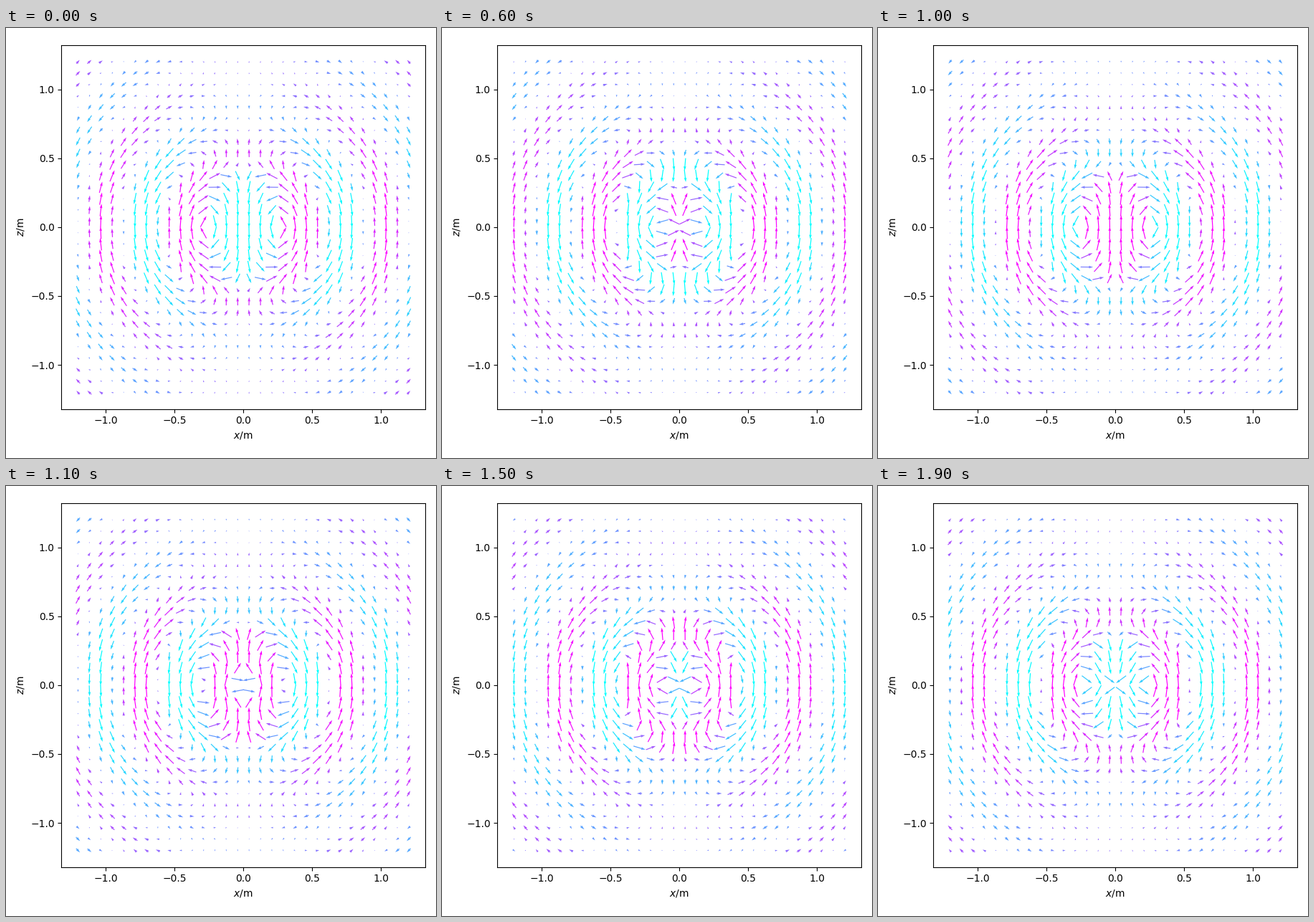
These frames come from a looping animation (600x600 px, 2000 ms). A matplotlib script:

```python
import numpy as np
import matplotlib.pyplot as plt
from matplotlib.animation import FuncAnimation

FRAMES = 20
INTERVAL = 100
WAVELENGTH = 0.6
K = 2 * np.pi / WAVELENGTH
LIMIT = 100  # longest arrow, in field units

axis = np.linspace(-1.2, 1.2, 30)
X, Z = np.meshgrid(axis, axis)
R = np.hypot(X, Z)
SIN, COS = X / R, Z / R


def dipole_field(frame):
    """Electric field of an oscillating dipole along z, capped in length."""
    phase = 2 * np.pi * frame / FRAMES - K * R
    near = np.sin(phase) / R**3 + K * np.cos(phase) / R**2
    far = K**2 * np.sin(phase) / R
    e_r = 2 * COS * near
    e_theta = SIN * (near - far)
    ex = e_r * SIN + e_theta * COS
    ez = e_r * COS - e_theta * SIN
    cap = np.minimum(1, LIMIT / np.hypot(ex, ez))
    return ex * cap, ez * cap


fig, ax = plt.subplots(figsize=(6, 6), dpi=100)
ex, ez = dipole_field(0)
arrows = ax.quiver(X, Z, ex, ez, ez, cmap="cool", pivot="mid")
arrows.set_clim(-LIMIT, LIMIT)
ax.set_aspect("equal")
ax.set_xlabel("$x$/m")
ax.set_ylabel("$z$/m")
fig.tight_layout()


def update(frame):
    ex, ez = dipole_field(frame)
    arrows.set_UVC(ex, ez, ez)
    return (arrows,)


anim = FuncAnimation(fig, update, frames=FRAMES, interval=INTERVAL,
                     repeat=True, repeat_delay=0)
plt.show()
```
